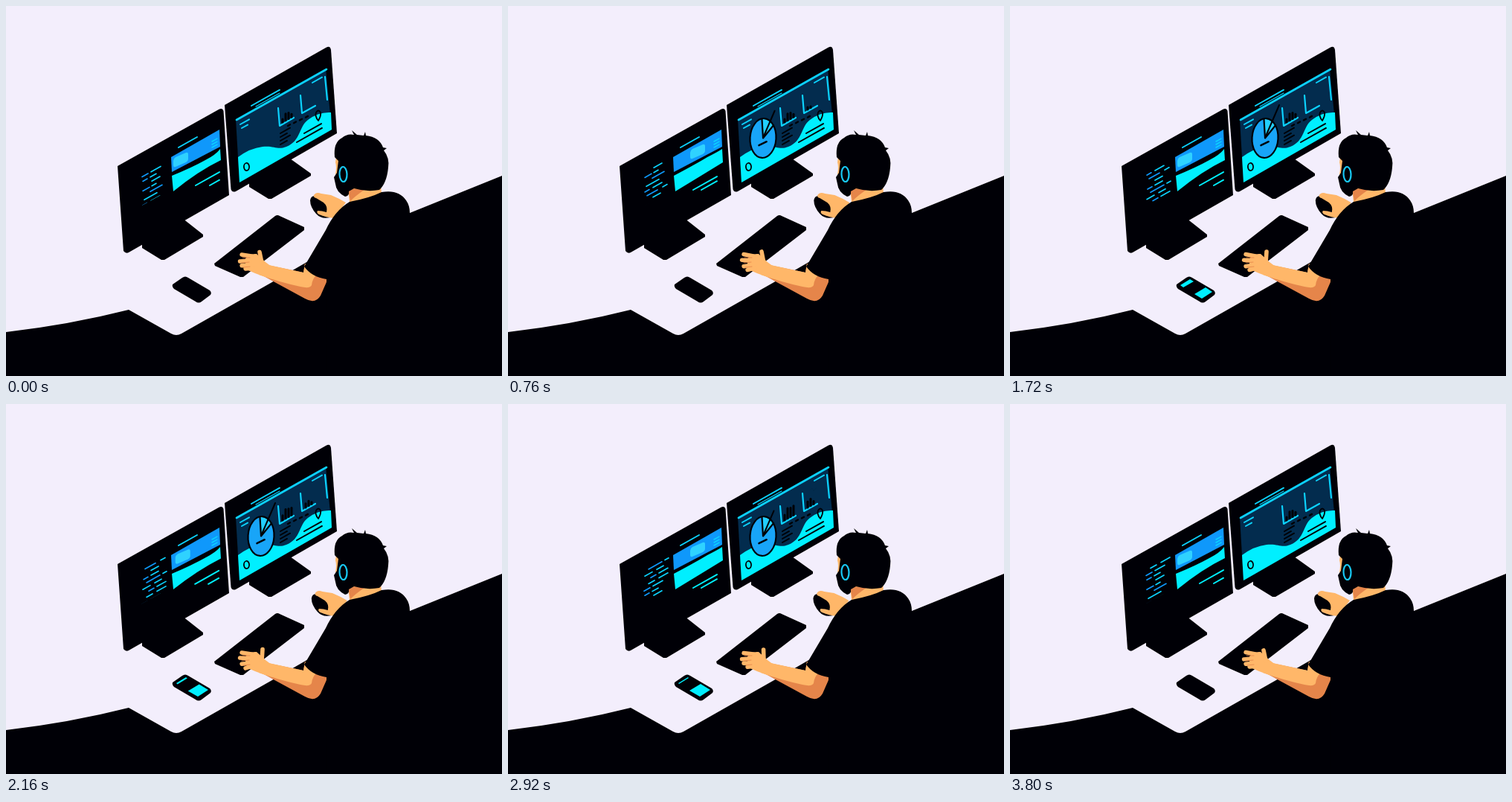
Recreate the animation shown at these times as an HTML page with a canvas. Size 667 by 497 pixels, loop 3.84 s.

```html
<!DOCTYPE html>
<html lang="en">
<head>
<meta charset="utf-8">
<title>Developer at work</title>
<style>
html, body { margin: 0; width: 100%; height: 100%; overflow: hidden; background: #f3eefc; }
canvas { display: block; }
</style>
</head>
<body>
<canvas id="stage" width="667" height="497"></canvas>
<script>
const ctx = document.getElementById('stage').getContext('2d');
const LOOP = 3840, SLOPE = -0.56;
const INK = '#000006', CYAN = '#00efff', SKY = '#0cd2ff', BLUE = '#0f98fb', NAVY = '#032c4e';
const SKIN = '#ffb769', SHADE = '#e5854a', PAPER = '#f3eefc';

const fill = (color, d) => { ctx.fillStyle = color; ctx.fill(new Path2D(d)); };
const line = (color, width, d) => {
  ctx.strokeStyle = color;
  ctx.lineWidth = width;
  ctx.stroke(new Path2D(d));
};
// Line lying along the screens' horizontal direction
const dash = (color, x, y, length, width = 2) =>
  line(color, width, `M${x} ${y}l${length} ${length * SLOPE}`);
const ease = (t, from, to) => {
  const p = Math.min(1, Math.max(0, (t - from) / (to - from)));
  return p * p * (3 - 2 * p);
};
const pulse = (t, a, b, c, d) => ease(t, a, b) - ease(t, c, d);
const wave = (t, cycles, phase = 0) => Math.sin((t / LOOP * cycles + phase) * 2 * Math.PI);
function group(draw, x = 0, y = 0, clip) {
  ctx.save();
  ctx.translate(x, y);
  if (clip) ctx.clip(new Path2D(clip));
  draw();
  ctx.restore();
}

// Code rows: indent, first length, gap, second length
const rows = [
  [6, 8, 6, 12], [0, 8, 4, 13], [1, 6, 4, 8], [13, 11, 0, 0], [1, 9, 3, 6], [11, 16, 0, 0], [3, 17, 0, 0],
  [1, 6, 5, 12], [4, 14, 7, 6], [12, 10, 0, 0], [2, 6, 4, 10], [6, 18, 4, 5], [1, 10, 6, 9], [9, 7, 4, 12]
];

function code(t) {
  const gap = 6.5, span = rows.length * gap;
  group(() => rows.forEach(([indent, first, space, second], i) => {
    const y = (i * gap + span - t / LOOP * span) % span;
    const color = i % 3 ? BLUE : SKY;
    const x = 183 + indent, base = 223 + y;
    dash(color, x, base + indent * SLOPE, first, 1.7);
    if (second) {
      const next = indent + first + space;
      dash(SKY, 183 + next, base + next * SLOPE, second, 1.7);
    }
  }), 0, 0, 'M181 221L219 200V248L181 269Z');
}

function leftMonitor(t) {
  fill(INK, 'M183 312L237 285L265 307V310L213 341H209L183 325Z');
  fill(INK, 'M150 215L286 139Q291 136 292.5 141L300 254L165 331Q161 333 158 329Z');
  dash(SKY, 232, 190, 25);
  code(t);

  const slide = pulse(t % 1920, 120, 640, 1300, 1700);
  fill(BLUE, 'M222 203L287 166L288 189L223 223Z');
  for (let i = 0; i < 3; i++) dash(SKY, 277, 182 + i * 4, 7, 1.5);
  group(() => fill('#2fd2ff', 'M-10 1Q-10 -2 -7 -4L7 -10Q10 -11 10 -8V-1Q10 1 7 3L-7 9Q-10 10 -10 7Z'),
    235 + 20 * slide, 207 - 11 * slide);
  fill(CYAN, `M223 228Q${250 + 5 * slide} ${217 - 6 * slide} 268 ${207 - 4 * slide}
    Q282 ${200 - 4 * slide} 288 192L289 ${207 + 3 * slide}Q258 ${222 + 7 * slide} 225 249Z`);
  dash(CYAN, 255 - 6 * slide, 241 + 6 * slide, 32);
  dash(CYAN, 274 - 14 * slide, 241 + 6 * slide, 13 + 8 * slide);
}

function pie(t) {
  const size = pulse(t, 60, 340, 3320, 3660);
  if (size < 0.01) return;
  const leader = pulse(t, 380, 900, 2800, 3180);
  group(() => {
    ctx.scale(size, size);
    ctx.rotate(0.06);
    ctx.beginPath();
    ctx.ellipse(0, 0, 17.5, 26.5, 0, 0, 7);
    ctx.fillStyle = '#18a5f8';
    ctx.fill();
    fill('#22cfff', 'M0 0L-3 -26Q8 -27 14 -17Z');
    ctx.strokeStyle = INK;
    ctx.lineWidth = 2.2;
    ctx.stroke();
    line(INK, 2.2, 'M-3 -25L0 0L13 -18');
    dash(INK, -5, 10, 10, 2.4);
  }, 343, 177.5);
  if (leader > 0) line(INK, 2, `M343 177L${343 + 19 * leader} ${177 - 44 * leader}`);
}

function bars(x, y, heights) {
  heights.forEach((h, i) => {
    if (h > 0.5) line(INK, 3, `M${x + i * 4} ${y + i * 4 * SLOPE}v${-h}`);
  });
}

function rightMonitor(t) {
  fill(INK, 'M327 232L382 205L410 225V228L357 259H353L327 243Z');
  fill(INK, 'M294 133L431 55.5Q436 53 437 59L445 171L309 249Q304 251 302.5 246Z');
  dash(SKY, 330, 134, 38);
  dash(SKY, 336, 135, 32, 1.2);
  fill(NAVY, 'M309 152L430 84L438 166L314 237Z');
  fill(CYAN, `M312 203Q328 191 345 189C360 187 365 194 377 189
    C397 181 393 163 406 153Q420 142 437 143L438 166L314 237Z`);
  line(SKY, 2.6, 'M310 153L431 85');
  line(SKY, 2.2, 'M429 95L432 126');
  dash(SKY, 412, 103, 13);
  dash(SKY, 315, 159, 12);
  dash(SKY, 317, 164, 8);
  line(SKY, 2.2, 'M366 137L368 161L387 150M396 120L398 144L416 134');

  const tall = pulse(t, 1900, 2400, 2800, 3200);
  bars(372, 156, [4 + 4 * tall, 9 + 6 * tall, 8 + 5 * tall, 4 + 11 * tall]);
  const peak = pulse(t, 700, 1050, 1250, 1600);
  bars(403, 139, [3 * pulse(t, 100, 340, 1400, 1650) + 10 * tall, 23 * peak + 12 * tall, 5 * tall]);
  if (peak > 0.5) line(INK, 2, 'M407 116l4 3l3 -4');
  const mark = pulse(t, 2900, 3120, 3320, 3600);
  if (mark > 0) line(INK, 2 * mark, 'M406 116l3 -3l2 4l3 -4');

  for (let i = 0; i < 4; i++) {
    dash(INK, 369, 171 + i * 5, 13 - i % 2 * 4, 2);
    dash(INK, 379 + i * 8, 161 - i * 3.8, 3, 2.4);
  }
  dash(INK, 391, 183, 34);
  dash(INK, 401, 171, 23);
  line(INK, 1.8, 'M420 154Q415 148 417 143Q420 138 423 143Q424 147 420 154M320 217a3.5 5 0 1 1 7 -2a3.5 5 0 1 1 -7 2');
  pie(t);
}

function phone(t) {
  fill(INK, 'M224 374L237 365Q241 362 245 365L274 382Q277 385 275 388L263 397Q259 400 255 397L226 380Q223 377 224 374Z');
  const lit = pulse(t, 1480, 1700, 3400, 3650);
  if (lit <= 0) return;
  const open = ease(t, 1800, 2300);
  ctx.globalAlpha = lit;
  fill(CYAN, `M229 375L242 367L${247 - 4 * open} ${370 - 2 * open}L${233 - 3 * open} ${378 - 2 * open}Z`);
  fill(CYAN, `M${248 - 4 * open} ${387 - 2 * open}L${263 - 4 * open} ${378 - 2 * open}L272 384L258 393Z`);
  ctx.globalAlpha = 1;
}

function typingHand(t) {
  const tap = i => wave(t, 8, i * 0.27);
  const thumb = 341 + 4 * pulse(t, 1500, 1700, 2800, 3100);
  fill(SKIN, 'M321 341Q326 332 337 333L349 344L357 350L349 364Q331 358 324 354Z');
  line(SKIN, 5.4, `M330 336L317 ${334 + tap(0)}M328 342L314.5 ${342 + tap(1)}M328 348L317 ${349 + tap(2)}M332 352L322 ${354 + tap(3)}`);
  line(SKIN, 5.6, `M344 345L${thumb} ${330 + tap(1.5)}`);
  line(SHADE, 0.8, 'M318 338L328 338M317 345L327 344M319 351L328 350');
}

function mouseHand(t) {
  const shift = 2.6 * ease(t, 60, 340) - 0.8 * ease(t, 600, 1000) - 1.8 * ease(t, 2800, 3200);
  group(() => {
    fill(INK, 'M409 261Q410 254 417 255L432 264L436 284Q424 287 417 279Q409 270 409 261Z');
    fill(SKIN, `M414 254Q417 249 424 252L437 254Q447 258 457 264L441 285Q430 284 421 280
      Q417 278 419 275Q425 275 431 277Q433 269 427 264L417 258Q413 257 414 254Z`);
  }, shift, 0);
}

function person() {
  // Arm
  fill(SHADE, 'M343 361L402 393Q416 401 423 389L434 364L402 346L400 358L352 348Z');
  fill(SKIN, 'M340 357L349 347L400 358L402 346L418 361Q412 366 411 375Q409 380 396 377Q368 371 340 361Z');
  // Neck and face
  fill(SKIN, 'M460 246L504 240L505 252Q485 261 462 264Z');
  fill(SHADE, 'M460 245L483 246Q470 255 463 262Z');
  fill(SKIN, 'M444 203L453 205V229L443 226Q445 216 443 210Z');
  // Shirt
  fill(INK, 'M462 263Q489 258 505 250Q528 246 538 261Q543 268 543 278V497H430L431 367Q411 364 401 350L430 301Q442 275 462 263Z');
  // Hair and beard
  fill(INK, `M442 203Q440 183 452 177Q459 171 468 173L465 167L472 173L481 174L483 169L484 174
    Q502 176 507 190L512 191L508 194Q516 204 514 217Q512 238 502 247Q485 250 468 245L461 249
    Q462 255 456 256Q444 250 443 239L441 230L445 224L447 208Z`);
  ctx.beginPath();
  ctx.ellipse(453.5, 226, 5, 10, -0.04, 0, 7);
  ctx.strokeStyle = '#18c8f5';
  ctx.lineWidth = 2.2;
  ctx.stroke();
}

function draw(t) {
  fill(PAPER, 'M0 0H667V497H0Z');
  fill(INK, 'M0 438Q86 428 165 408L222 440Q229 444 236 440L356 372L420 335L543 278L667 228V497H0Z');
  leftMonitor(t);
  rightMonitor(t);
  fill(INK, 'M280 346L362 282Q365 280 368 282L401 297V301L319 364H315L281 349Z');
  phone(t);
  mouseHand(t);
  person();
  typingHand(t);
}

ctx.lineCap = ctx.lineJoin = 'round';
function tick() {
  draw(performance.now() % LOOP);
  requestAnimationFrame(tick);
}
tick();
</script>
</body>
</html>
```
